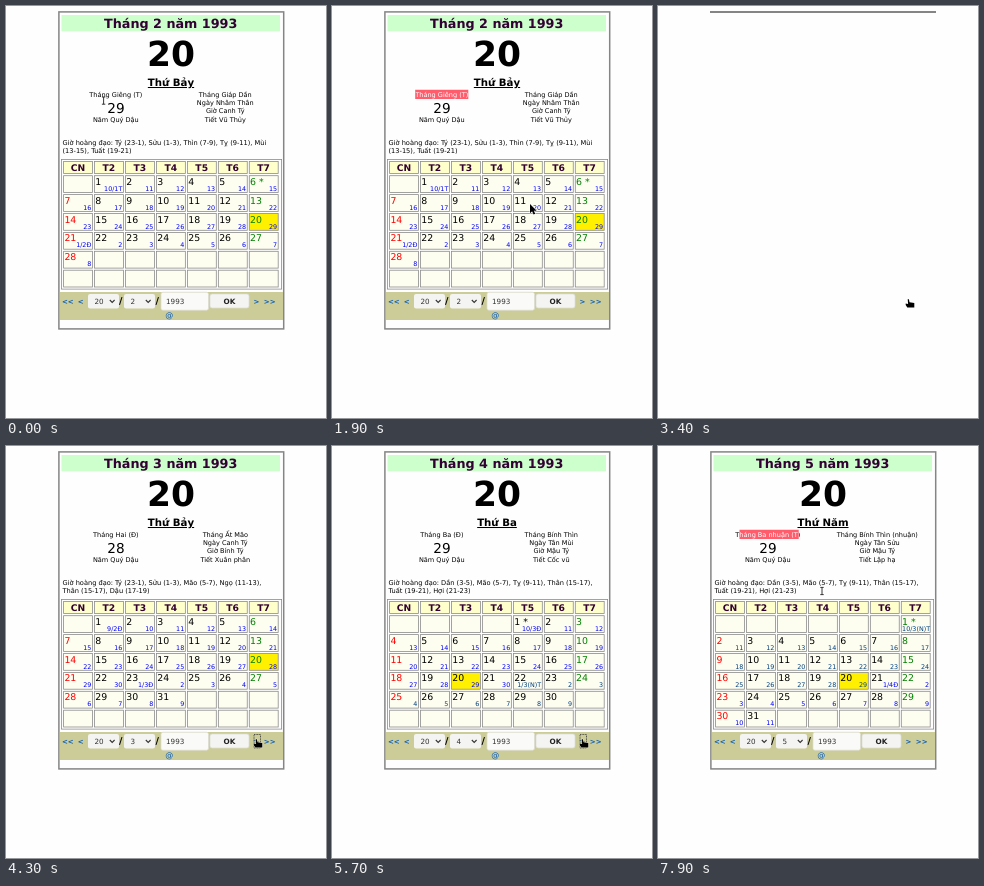
Recreate the animation shown at these times as an HTML page. Size 320 by 412 pixels, loop 8000 ms.

```html
<!DOCTYPE html>
<html lang="vi">
<head>
<meta charset="utf-8">
<title>Lịch tháng</title>
<style>
html, body { margin: 0; width: 100%; height: 100%; overflow: hidden; background: #fefefe; }
svg { display: block; width: 320px; height: 412px; }
text { font-family: "DejaVu Sans", sans-serif; text-rendering: geometricPrecision; white-space: pre; }
.plain text { font-family: "Open Sans", "Noto Sans", sans-serif; }
.plain .ui { font-family: "DejaVu Sans", sans-serif; }
</style>
</head>
<body>
<svg id="stage" viewBox="0 0 320 412" xmlns="http://www.w3.org/2000/svg"></svg>
<script>
const NS = "http://www.w3.org/2000/svg";
const stage = document.getElementById("stage");
const LOOP = 8000, STEP = 100;
const HEADS = ["CN", "T2", "T3", "T4", "T5", "T6", "T7"];
const HOURS = ["Dần (3-5), Mão (5-7), Tỵ (9-11), Thân (15-17),", "Tuất (19-21), Hợi (21-23)"];

const MONTHS = {
  2: { first: 1, days: 28, lunar: 10, len: 29, from: "10/1T", next: "1/2Đ", star: 6,
    day: "Thứ Bảy", moon: "Tháng Giêng (T)", moonDay: 29,
    info: ["Tháng Giáp Dần", "Ngày Nhâm Thân", "Giờ Canh Tý", "Tiết Vũ Thủy"],
    hours: ["Tý (23-1), Sửu (1-3), Thìn (7-9), Tỵ (9-11), Mùi", "(13-15), Tuất (19-21)"] },
  3: { first: 1, days: 31, lunar: 9, len: 30, from: "9/2Đ", next: "1/3Đ",
    day: "Thứ Bảy", moon: "Tháng Hai (Đ)", moonDay: 28,
    info: ["Tháng Ất Mão", "Ngày Canh Tý", "Giờ Bính Tý", "Tiết Xuân phân"],
    hours: ["Tý (23-1), Sửu (1-3), Mão (5-7), Ngọ (11-13),", "Thân (15-17), Dậu (17-19)"] },
  4: { first: 4, days: 30, lunar: 10, len: 30, from: "10/3Đ", next: "1/3(N)T", star: 1, leap: d => d > 21,
    day: "Thứ Ba", moon: "Tháng Ba (Đ)", moonDay: 29,
    info: ["Tháng Bính Thìn", "Ngày Tân Mùi", "Giờ Mậu Tý", "Tiết Cốc vũ"], hours: HOURS },
  5: { first: 6, days: 31, lunar: 10, len: 29, from: "10/3(N)T", next: "1/4Đ", star: 1, leap: d => d < 21,
    day: "Thứ Năm", moon: "Tháng Ba nhuận (T)", moonDay: 29,
    info: ["Tháng Bính Thìn (nhuận)", "Ngày Tân Sửu", "Giờ Mậu Tý", "Tiết Lập hạ"], hours: HOURS }
};

function add(parent, tag, attrs = {}) {
  const el = document.createElementNS(NS, tag);
  for (const k in attrs) el.setAttribute(k, attrs[k]);
  parent.appendChild(el);
  return el;
}
const rect = (g, x, y, width, height, fill, more) => add(g, "rect", { x, y, width, height, fill, ...more });
function text(g, str, x, y, size, more) {
  const el = add(g, "text", { x, y, "font-size": size, ...more });
  el.textContent = str;
  return el;
}
const MID = { "text-anchor": "middle" };
const BOLD = { "font-weight": "bold" };
const LINK = "#0a5cb8";
const show = (el, on) => el.setAttribute("display", on ? "inline" : "none");

function lunarOf(c, d) {
  let n = c.lunar + d - 1;
  if (n > c.len) n -= c.len;
  return d === 1 ? c.from : n === 1 ? c.next : String(n);
}
const dayOf = (c, d) => d + (d === c.star ? " *" : "");

function eachCell(c, draw) {
  for (let i = 0; i < 42; i++) {
    const d = i - c.first + 1;
    draw(i % 7, Math.floor(i / 7), d > 0 && d <= c.days ? d : 0);
  }
}
const box = (g, x, y, w, h, fill) =>
  rect(g, x + .4, y + .4, w - .8, h - .8, fill, { stroke: "#8c8c8c", "stroke-width": .8 });
const frame = (g, h) => rect(g, 52.9, 5.9, 224.8, h, "none", { stroke: "#858585", "stroke-width": 1.5 });

function select(g, label, x, y) {
  rect(g, x, y, 31, 14.5, "#f4f4f2", { rx: 2 });
  text(g, label, x + 6.5, y + 10, 7.2, { fill: "#333", class: "ui" });
  add(g, "path", { d: `M${x + 21.8} ${y + 6}l2.4 2.4l2.4-2.4`, fill: "none", stroke: "#333", "stroke-width": 1.1 });
}
function fields(g, m, x, y) {
  select(g, "20", x, y);
  select(g, m, x + 36, y);
  rect(g, x + 73, y - 1.8, 47.5, 18, "#fafaf8", { rx: 2, stroke: "#dcdcd4", "stroke-width": .7 });
  text(g, "1993", x + 78, y + 10, 7.2, { fill: "#333", class: "ui" });
  const btn = rect(g, x + 122, y, 39, 14, "#f4f4f2", { rx: 2, stroke: "#dcdcd4", "stroke-width": .7 });
  text(g, "OK", x + 141.5, y + 10, 7.3, { ...MID, ...BOLD, fill: "#222", class: "ui" });
  return btn;
}

function styledPage(m) {
  const c = MONTHS[m], g = add(stage, "g");
  frame(g, 317);
  rect(g, 55.5, 9, 218.5, 16.3, "#ccffcc");
  text(g, `Tháng ${m} năm 1993`, 164.7, 21.8, 12.75, { ...MID, ...BOLD, fill: "#330033" });
  text(g, "20", 165, 60, 34.5, { ...MID, ...BOLD });
  text(g, c.day, 165, 80, 10.2, { ...MID, ...BOLD, "text-decoration": "underline" });
  text(g, c.moon, 109.8, 90.6, 6.55, MID);
  text(g, c.moonDay, 110, 106.7, 13.6, MID);
  text(g, "Năm Quý Dậu", 109.8, 116, 6.55, MID);
  c.info.forEach((s, i) => text(g, s, 219.3, 90.6 + 8.35 * i, 6.55, MID));
  text(g, "Giờ hoàng đạo: " + c.hours[0], 56.5, 138.5, 6.64);
  text(g, c.hours[1], 56.5, 147.4, 6.64);

  box(g, 55, 153, 221, 130.5, "#fefefe");
  const left = i => 57.2 + 30.95 * i;
  HEADS.forEach((s, i) => {
    box(g, left(i), 155, 29.7, 13, "#ffffcc");
    text(g, s, left(i) + 14.7, 165.1, 9.2, { ...MID, ...BOLD, fill: "#330033" });
  });
  eachCell(c, (col, row, d) => {
    const x = left(col), y = 169.3 + 18.9 * row;
    box(g, x, y, 29.7, 17.6, d === 20 ? "#fff000" : "#fdfdf0");
    if (!d) return;
    const lunar = lunarOf(c, d);
    text(g, dayOf(c, d), x + 1.2, y + 9.4, 9.4, { fill: col === 0 ? "red" : col === 6 ? "green" : "black" });
    text(g, lunar, x + 28.2 + (lunar.length > 7 ? 1 : 0), y + 15.4, 6.4,
      { "text-anchor": "end", fill: c.leap && c.leap(d) ? "#004080" : "blue" });
  });

  rect(g, 54, 286, 223, 28, "#cccc99");
  [["<<", 56], ["<", 71.7], [">", 247.5], [">>", 257.8]].forEach(([s, x]) =>
    text(g, s, x, 297.8, 7, { ...BOLD, fill: LINK }));
  text(g, "/", 114.8, 298.4, 9.5, { ...BOLD, ...MID });
  text(g, "/", 151.2, 298.4, 9.5, { ...BOLD, ...MID });
  const btn = fields(g, m, 82, 288);
  text(g, "@", 163.3, 312.3, 8, { ...MID, fill: LINK });
  return { g, btn };
}

function plainPage(m) {
  const c = MONTHS[m], g = add(stage, "g", { class: "plain" }), F = 8.1;
  const put = (s, x, y) => text(g, s, x, y, F);
  frame(g, 351);
  put(`Tháng ${m} năm 1993`, 56, 18);
  put("20", 56, 31);
  put(c.day, 56, 44);
  [c.moon, c.moonDay, "Năm Quý Dậu"].forEach((s, i) => put(s, 56, 62.4 + 11.4 * i));
  c.info.forEach((s, i) => put(s, 156, 56.5 + 11.3 * i));
  put("Giờ hoàng đạo: Dần (3-5), Mão (5-7), Tỵ (9-11), Thân", 56, 117);
  put("(15-17), Tuất (19-21), Hợi (21-23)", 56, 128.4);

  const xs = [57, 85, 111.3, 138, 164.3, 222.3, 248.3, 274.5];
  box(g, 55, 134, 221, 180.5, "#fefefe");
  HEADS.forEach((s, i) => {
    box(g, xs[i], 136, xs[i + 1] - xs[i] - 1.2, 14, "#fefefe");
    put(s, xs[i] + 1.4, 145.6);
  });
  eachCell(c, (col, row, d) => {
    const x = xs[col], y = 151.3 + 27.1 * row;
    box(g, x, y, xs[col + 1] - x - 1.2, 25.8, "#fefefe");
    if (!d) return;
    put(dayOf(c, d), x + 1.4, y + 10.4);
    put(lunarOf(c, d), x + 1.4, y + 21.7);
  });
  [["<<", 52.8], ["<", 67.2], [">", 243], [">>", 252.8], ["@", 268.6]].forEach(([s, x]) =>
    text(g, s, x, 329, F, { fill: "#0000ee", "text-decoration": "underline" }));
  put("/", 108.3, 329);
  put("/", 145.2, 329);
  fields(g, m, 77, 319);
  return { g };
}

const pages = { 2: styledPage(2), 3: styledPage(3), 4: styledPage(4), 5: styledPage(5), raw: plainPage(4) };
pages.blank = { g: add(stage, "g") };
rect(pages.blank.g, 52, 5, 226, 2, "#858585");

// highlighted part of the lunar month label
const clipRect = rect(add(add(stage, "defs"), "clipPath", { id: "mark" }), 0, 83.8, 0, 9.2, "#000");
const mark = add(stage, "g", { "clip-path": "url(#mark)" });
rect(mark, 70, 83, 80, 12, "#ff5c6c");
const markText = text(mark, "", 109.8, 90.6, 6.55, { ...MID, fill: "#fff" });

const focus = rect(stage, 248, 288.5, 6.5, 13.5, "none", { stroke: "#333", "stroke-width": .8, "stroke-dasharray": "1 .6" });

const edge = { fill: "#000", stroke: "#fff", "stroke-width": .7, "paint-order": "stroke" };
const cursors = {
  arrow: add(stage, "path", { ...edge, d: "M0 0V9.2L2.1 7.3 3.6 10.5 5.2 9.8 3.8 6.7H6.6z" }),
  hand: add(stage, "path", { ...edge, d: "M-1 .2H.2L.8 3.2 5.6 4V8.6H-1.4L-3 6V4.4L-.6 5z" }),
  ibeam: add(stage, "path", { fill: "none", stroke: "#222", "stroke-width": .9, d: "M-1.7-3.6H1.7M0-3.6V3.6M-1.7 3.6H1.7" })
};

const PAGE = [[0, 2], [3300, "blank"], [3500, 3], [4500, "blank"], [4700, "raw"], [4800, 4], [5900, 5]];
const SHAPE = [[0, "ibeam"], [1500, "arrow"], [2600, "hand"], [6000, "arrow"], [6600, "ibeam"]];
const PATH = [
  [0, 97.6, 94.6], [300, 86, 89], [400, 86, 89], [1100, 137, 89], [1400, 137, 89],
  [1900, 198, 198], [2300, 237, 295], [2500, 242, 295], [2600, 246, 293], [2800, 246, 293],
  [2900, 250.7, 293], [5900, 250.7, 293], [6200, 198, 215], [6500, 94, 104],
  [6700, 82, 89], [6800, 82, 89], [7500, 141, 88], [7600, 141, 88], [7900, 164, 145]
];
const MARKS = [
  { from: 400, to: 1100, end: 3300, x0: 83.2, x1: 136.3, label: MONTHS[2].moon },
  { from: 6800, to: 7500, end: LOOP, x0: 81.5, x1: 140.7, label: MONTHS[5].moon }
];

const at = (list, t) => list.filter(e => e[0] <= t).pop();
function pointAt(t) {
  const a = at(PATH, t), b = PATH[PATH.indexOf(a) + 1] || a;
  const k = a === b ? 0 : (t - a[0]) / (b[0] - a[0]);
  return [a[1] + (b[1] - a[1]) * k, a[2] + (b[2] - a[2]) * k];
}

function render(t) {
  const page = at(PAGE, t)[1], shape = at(SHAPE, t)[1];
  for (const k in pages) show(pages[k].g, k === String(page));
  pages[2].btn.setAttribute("fill", t >= 2200 && t < 2500 ? "#fff" : "#f4f4f2");

  const m = MARKS.find(e => t > e.from && t < e.end);
  show(mark, m);
  if (m) {
    const k = Math.min(1, (t - m.from) / (m.to - m.from));
    clipRect.setAttribute("x", m.x0);
    clipRect.setAttribute("width", (m.x1 - m.x0) * k);
    if (markText.textContent !== m.label) markText.textContent = m.label;
  }
  show(focus, (t >= 4300 && t < 4500) || (t >= 5700 && t < 5900));

  const [x, y] = pointAt(t);
  for (const k in cursors) show(cursors[k], k === shape);
  cursors[shape].setAttribute("transform", `translate(${x} ${y})`);
}

const start = performance.now();
function tick() {
  const t = (performance.now() - start) % LOOP;
  render(Math.floor(t / STEP) * STEP);
  requestAnimationFrame(tick);
}
tick();
</script>
</body>
</html>
```
